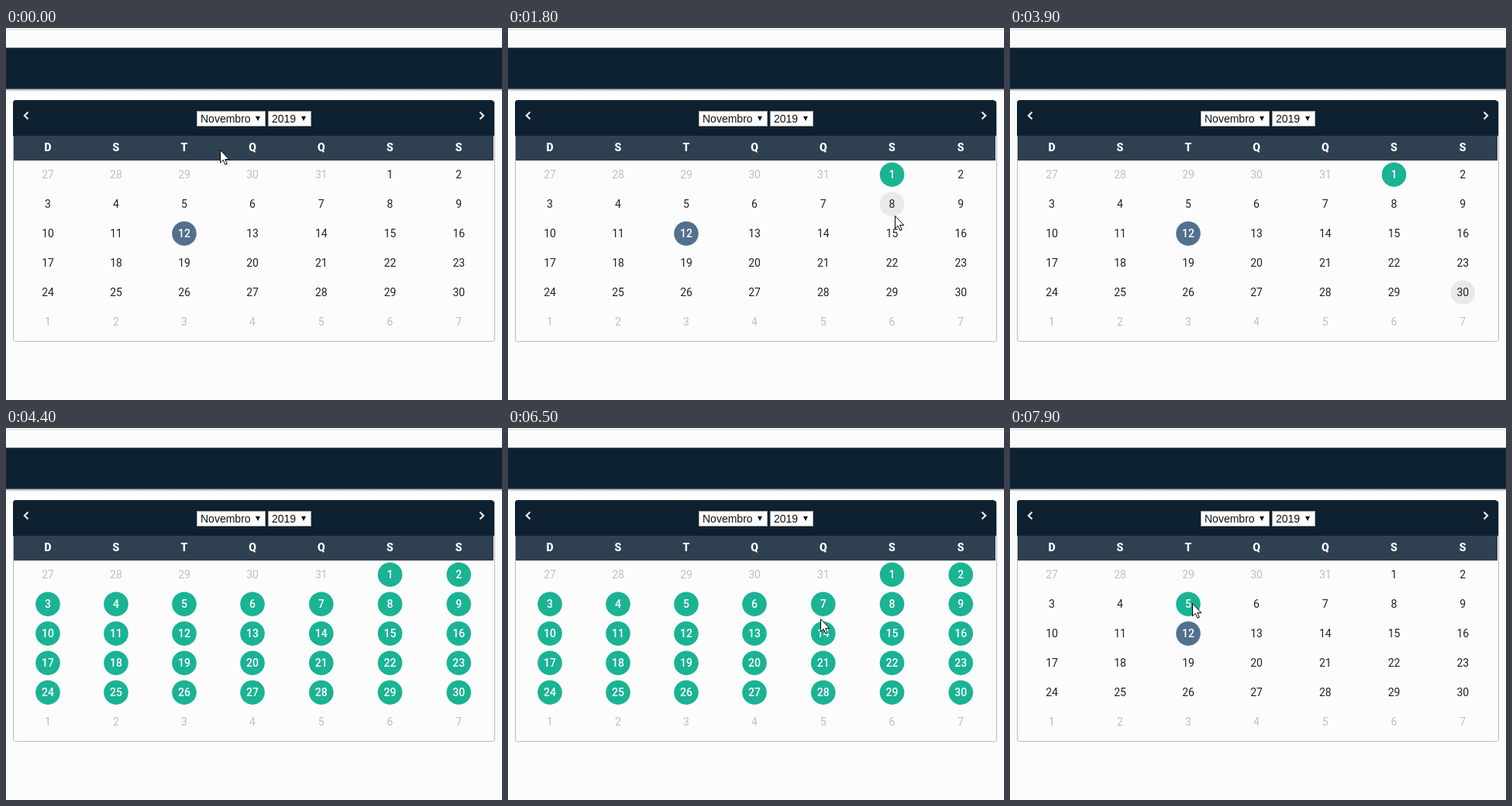
Animation, 640 px wide and 480 px high, one loop 8 s. Source, as an HTML page:

```html
<!DOCTYPE html>
<html lang="pt">
<head>
<meta charset="utf-8">
<title>Calendário</title>
<style>
  html, body { margin: 0; width: 100%; height: 100%; overflow: hidden; background: #fcfcfc; }
  svg { display: block; width: 640px; height: 480px; }
  text { font: 14px Roboto, sans-serif; fill: #22222a; text-anchor: middle; }
  .weekday { font-weight: 900; fill: #fff; }
  .other text { fill: #bfbfc4; }
  .field { fill: #fff; stroke: #a6a6a6; }
  .option { font: 14px "Liberation Sans", Arial, sans-serif; fill: #111; text-anchor: start; }
  .day circle { fill: none; }
  .hover circle { fill: #e9e9e9; }
  .today circle { fill: #52708f; }
  .selected circle { fill: #1ab394; }
  .today text, .selected text { fill: #fff; font-weight: 500; }
  .chevron { fill: none; stroke: #fff; stroke-width: 2; }
</style>
</head>
<body>
<svg viewBox="0 0 640 480">
  <defs>
    <linearGradient id="shade" x2="0" y2="1">
      <stop stop-color="#8f969c"/><stop offset="1" stop-color="#fcfcfc"/>
    </linearGradient>
  </defs>
  <rect width="640" height="480" fill="#fcfcfc"/>
  <rect y="1" width="640" height="2" fill="#e7e7e7"/>
  <rect y="78" width="640" height="4" fill="url(#shade)"/>
  <rect y="25.5" width="640" height="53" fill="#0d2131"/>
  <path d="M9.5 139V96.5a3 3 0 0 1 3-3H627a3 3 0 0 1 3 3V139Z" fill="#0d2131"/>
  <rect x="10" y="139" width="619" height="32" fill="#2f4050"/>
  <rect x="9.5" y="93.5" width="621" height="311" rx="3" fill="none" stroke="#b9b9b9"/>
  <path d="M10 139V97a3 3 0 0 1 3-3H627" fill="none" stroke="#0d2131" stroke-width="2"/>
  <path class="chevron" d="M28.5 108.5 23.8 113l4.7 4.5M611.5 108.5 616.2 113l-4.7 4.5"/>
  <rect class="field" x="246.5" y="107.5" width="88" height="19"/>
  <rect class="field" x="338.5" y="107.5" width="55" height="19"/>
  <text class="option" x="251" y="122">Novembro</text>
  <text class="option" x="343" y="122">2019</text>
  <path d="M322 114h6l-3 6zM381 114h6l-3 6z" fill="#111"/>
  <g id="days"></g>
  <path id="cursor" d="M.5 .5V16.8L4.2 13.3 6.9 19.3 9.3 18.2 6.7 12.4H11.8Z" fill="#fff" stroke="#000"/>
</svg>
<script>
const LOOP = 8000, STEP = 100, RADIUS = 15.8, TODAY = 12;
const layer = document.getElementById('days');
const cursor = document.getElementById('cursor');

function add(parent, name, attrs, content = '') {
  const node = document.createElementNS('http://www.w3.org/2000/svg', name);
  for (const key in attrs) node.setAttribute(key, attrs[key]);
  node.textContent = content;
  return parent.appendChild(node);
}

// The last columns are slightly wider than the first ones.
const columnX = i => 54 + 88 * i + 0.75 * Math.max(0, i - 3);

[...'DSTQQSS'].forEach((letter, i) =>
  add(layer, 'text', { class: 'weekday', x: columnX(i), y: 159 }, letter));

const days = [];
for (let i = 0; i < 42; i++) {
  const x = columnX(i % 7), y = 189 + 38 * Math.floor(i / 7);
  const number = i - 4, inMonth = number >= 1 && number <= 30;
  const label = number < 1 ? number + 31 : number > 30 ? number - 30 : number;
  const node = add(layer, 'g', { class: inMonth ? 'day' : 'other' });
  if (inMonth) {
    add(node, 'circle', { cx: x, cy: y + 0.2, r: RADIUS });
    days.push({ node, x, y, number });
  }
  add(node, 'text', { x, y: y + 5 }, label);
}

const origin = { x: 276, y: 157 };
const moves = [
  { from: 0, to: 400, x: 493, y: 190 },
  { from: 900, to: 1300, x: 507, y: 285 },
  { from: 1300, to: 1600, x: 511, y: 235 },
  { from: 1700, to: 2600, x: 399, y: 298 },
  { from: 2900, to: 3800, x: 587, y: 342 },
  { from: 4700, to: 4900, x: 587, y: 350 },
  { from: 5400, to: 5900, x: 468, y: 341, bend: 2 },
  { from: 6000, to: 6900, x: 259, y: 222, bend: 2 },
  { from: 6900, to: 7400, x: 235, y: 226 }
];
const selections = [
  { at: 1000, first: 1, last: 1 },
  { at: 4400, first: 1, last: 30 },
  { at: 7900, first: 5, last: 5 }
];
const hidden = [{ from: 2700, to: 3000 }, { from: 3900, to: 4800 }, { from: 7600, to: 7900 }];

// A bend above 1 starts the move vertically and ends it horizontally.
function pointerAt(t) {
  let { x, y } = origin;
  for (const move of moves) {
    const k = Math.min(1, Math.max(0, (t - move.from) / (move.to - move.from)));
    const bend = move.bend || 1;
    x += (move.x - x) * k ** bend;
    y += (move.y - y) * (1 - (1 - k) ** bend);
  }
  return { x: Math.round(x), y: Math.round(y) };
}

function draw(now) {
  const t = Math.floor(now % LOOP / STEP) * STEP;
  const pointer = pointerAt(t);
  const range = selections.filter(s => s.at <= t).pop();
  const isHidden = hidden.some(span => t >= span.from && t < span.to);

  cursor.setAttribute('transform', `translate(${pointer.x} ${pointer.y})`);
  cursor.style.visibility = isHidden ? 'hidden' : 'visible';
  for (const { node, x, y, number } of days) {
    const state = range && number >= range.first && number <= range.last ? ' selected'
      : number === TODAY ? ' today'
      : Math.hypot(pointer.x - x, pointer.y - y) < RADIUS ? ' hover' : '';
    node.setAttribute('class', 'day' + state);
  }
}

const start = performance.now();
function tick() {
  draw(performance.now() - start);
  requestAnimationFrame(tick);
}
tick();
</script>
</body>
</html>
```
